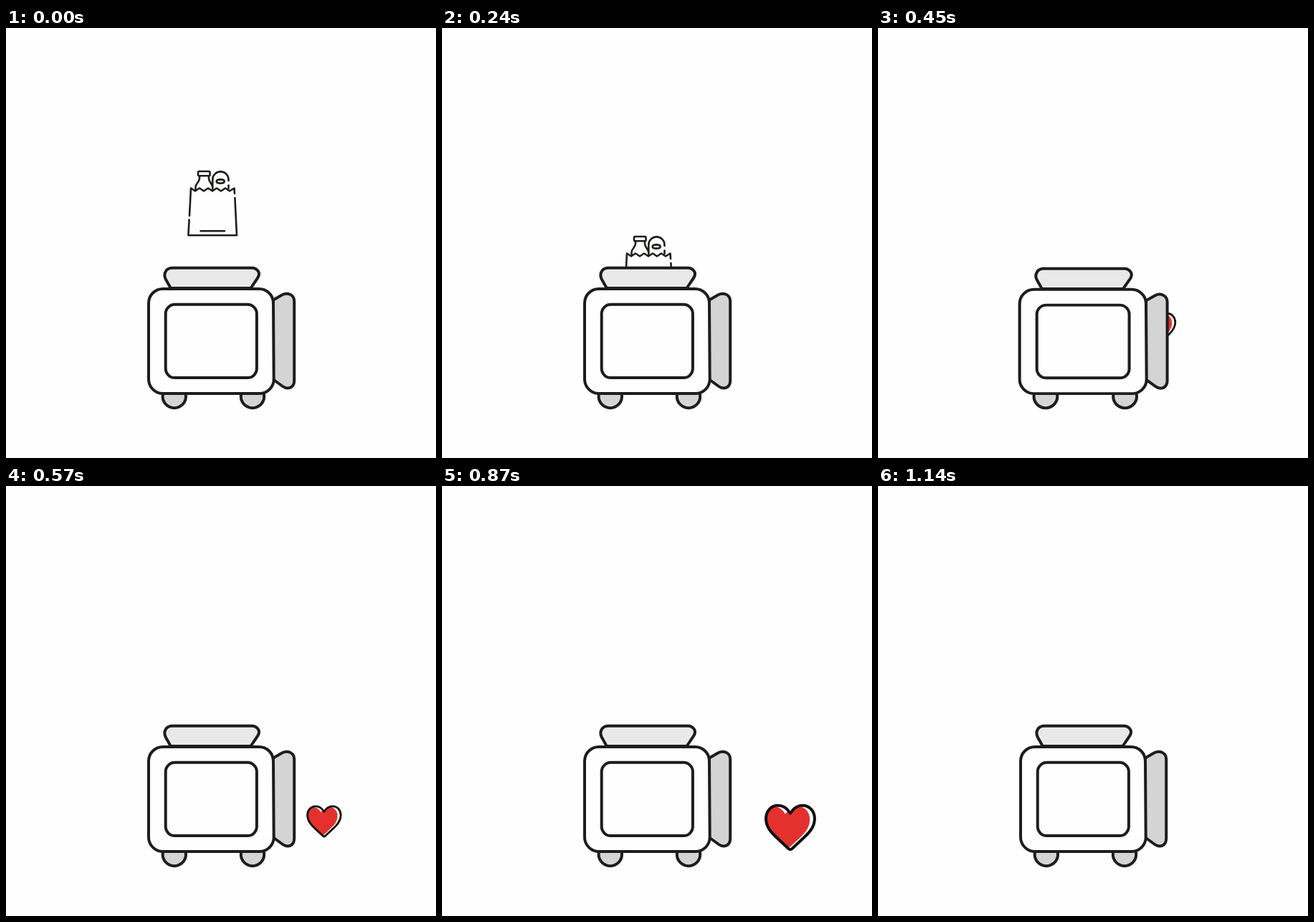
Animation, 600 px wide and 600 px high, one loop 1.2 s. Source, as an HTML page:

```html
<!DOCTYPE html>
<html lang="en">
<head>
<meta charset="utf-8">
<title>Bag to heart machine</title>
<style>
  html, body { margin: 0; width: 100%; height: 100%; overflow: hidden; background: #fefefe; }
  svg { display: block; width: 100vw; height: 100vh; }
  path, rect, circle, ellipse { stroke-linecap: round; stroke-linejoin: round; }
</style>
</head>
<body>
<svg viewBox="0 0 600 600">
  <defs>
    <path id="shape" d="M0-13.5C-3-18.3-7-21-11.8-21C-18.5-21-23.3-15.5-23.3-8.5C-23.3-1-19 4-14 8.8L-1.6 20.4Q0 22 1.6 20.4L14 8.8C19 4 23.3-1 23.3-8.5C23.3-15.5 18.5-21 11.8-21C7-21 3-18.3 0-13.5Z"/>
    <clipPath id="inside"><use href="#shape"/></clipPath>
  </defs>

  <g id="bag" fill="none" stroke="#1d1d1b" stroke-width="2.6">
    <rect x="268" y="200" width="16.5" height="6.3" rx="1.5"/>
    <path d="M270 206.5V210C270 215 264.5 217 264.5 222V225M283 206.5V210C283 215 287 216 288 221"/>
    <path d="M288.3 225V211.5A11.1 11.1 0 0 1 310.5 211.5V213M310.5 219.5V224"/>
    <ellipse cx="299.2" cy="214" rx="5.5" ry="2.6"/>
    <path d="M256 262L258 223.5L264 227.5L270 223.5L276 227.5L282 223.5L288 227.5L294 223.5L300 227.5L306 223.5L312 227.5L318.5 223.5L319 231M319.4 237L322 289.2H254.4L255.6 267.5M271.5 283.3H305"/>
  </g>

  <g id="heart">
    <use href="#shape" fill="#fefefe"/>
    <g clip-path="url(#inside)"><use href="#shape" x="-4.6" y=".8" fill="#e4312d"/></g>
    <use href="#shape" fill="none" stroke="#111" stroke-width="2.8"/>
  </g>

  <g id="machine" stroke="#1d1d1b" stroke-width="4">
    <g fill="#d4d4d4">
      <circle cx="234.8" cy="514" r="16.2"/>
      <circle cx="344" cy="514" r="16.2"/>
      <path d="M373 379.5L385.5 372.3Q391 369.3 396.5 371.8Q402.2 374.5 402.2 381V492Q402.2 499 397 501.7Q391.5 504 386 500L373 490.5Z"/>
    </g>
    <path fill="#e9e9e9" d="M229.8 363L222.8 350.5Q219.500 344 223.500 338.500Q226.500 334.700 232 334.700H343Q349 334.700 352 339.500Q354.500 344 351 349L341.500 363Z"/>
    <path fill="#fefefe" d="M219 363.900H353A20 20 0 0 1 373 383.900L373.700 490A20 20 0 0 1 353.700 510H219A20 20 0 0 1 199 490V383.900A20 20 0 0 1 219 363.900Z"/>
    <rect x="222.700" y="385.800" width="127.200" height="102.300" rx="13" fill="#fefefe"/>
  </g>
</svg>
<script>
  const LOOP = 1200, STEP = 30;
  const [bag, heart, machine] = ["bag", "heart", "machine"].map(id => document.getElementById(id));

  const span = (t, from, to) => Math.min(1, Math.max(0, (t - from) / (to - from)));
  const ease = p => p * p * (3 - 2 * p);
  const mix = (a, b, p) => a + (b - a) * p;
  const show = (el, on) => el.setAttribute("visibility", on ? "visible" : "hidden");

  function draw(t) {
    // The bag sinks into the hopper
    bag.setAttribute("transform", `translate(0 ${182 * ease(span(t, 0, 480))})`);
    show(bag, t < 480);

    // The machine squashes on its wheels and recovers
    const squash = ease(1 - Math.abs(span(t, 240, 480) * 2 - 1));
    machine.setAttribute("transform",
      `translate(301 531) scale(${1 + .088 * squash} ${1 - .036 * squash}) translate(-301 -531)`);

    // The heart slides out, then rises while it grows
    const out = ease(span(t, 360, 720)), up = span(t, 720, 960);
    const x = mix(374, 486, out);
    const y = mix(mix(403, 507, out), 426.5, ease(up ** 1.85));
    const size = mix(1, 1.93, ease(up ** 1.5));
    heart.setAttribute("transform", `translate(${x} ${y}) scale(${size})`);
    show(heart, t >= 360 && t < 1140);
  }

  function tick() {
    draw(Math.floor(performance.now() % LOOP / STEP) * STEP);
    requestAnimationFrame(tick);
  }
  tick();
</script>
</body>
</html>
```
